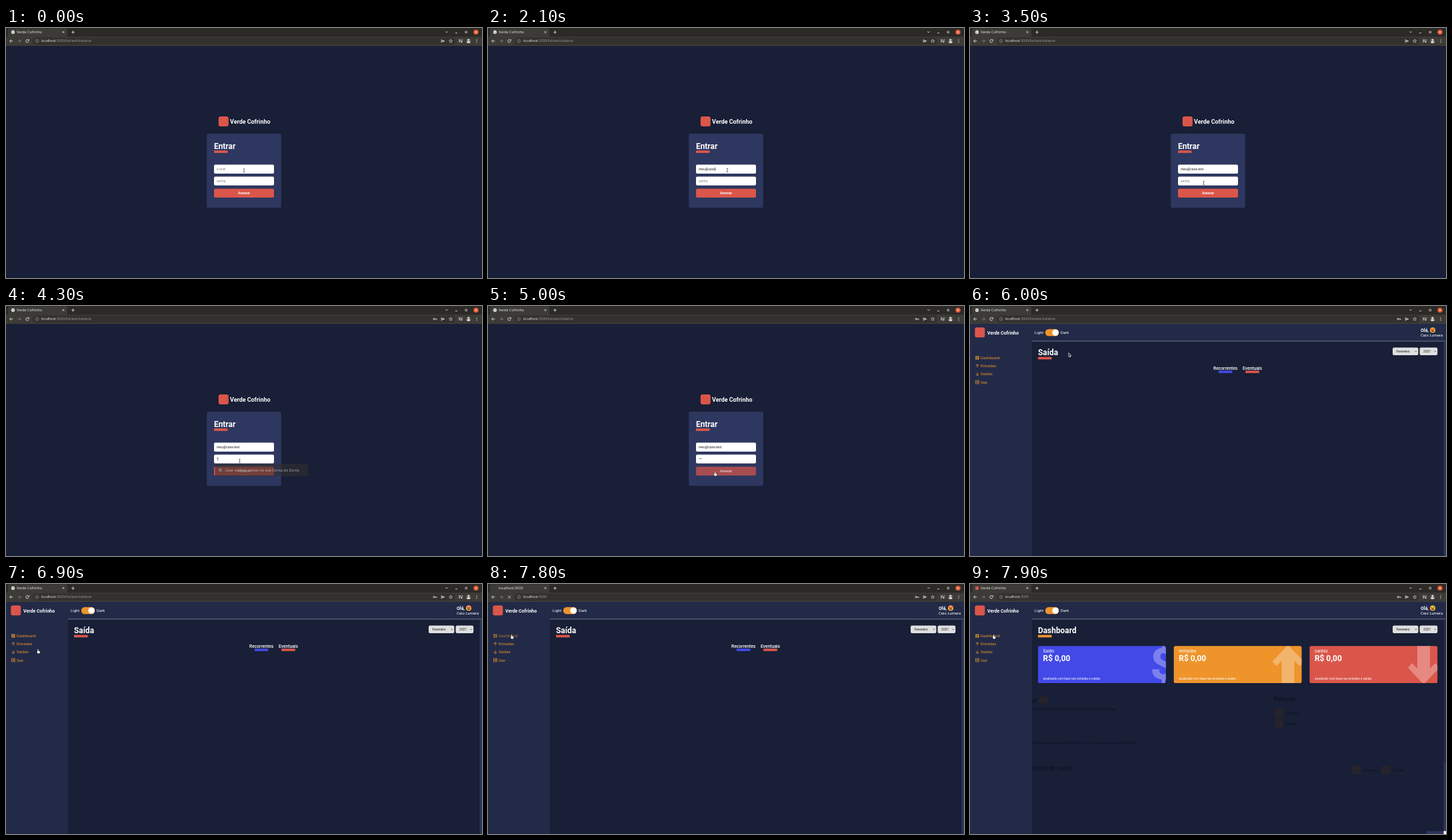
An HTML page with a canvas that plays this animation: 714 by 376 pixels, repeating every 8 s.

```html
<!DOCTYPE html>
<html lang="pt-BR">
<head>
<meta charset="utf-8">
<title>Verde Cofrinho</title>
<style>
html, body { margin: 0; width: 714px; height: 376px; overflow: hidden; background: #181f36; }
canvas { display: block; width: 714px; height: 376px; }
</style>
</head>
<body>
<canvas id="stage"></canvas>
<script>
const W = 714, H = 376, LOOP = 8000, STEP = 100;
const BG = '#181f36', SIDE = '#222a48', CARD = '#2e375f', THUMB = '#2c355a';
const RED = '#da564a', ORANGE = '#ee942b', BLUE = '#4249e7', WHITE = '#fff';
const INK = '#e6e4df', DIM = '#9d9a94';
const ROBOTO = 'Roboto, sans-serif', UI = '"Noto Sans", sans-serif';
const BRAND = 'Verde Cofrinho', EMAIL = 'meu@casa.test', USER = 'Caio Lumera';
const REM = 5.95, SMALL = 4.96, LABEL = 6.7, H1 = 11.9;

// Moments of the story
const FOCUS = 100, TYPE = [1000, 2700], PASS = [4200, 4500], FOCUS_PASS = 3700;
const LOGIN_END = 5100, LOADING = 7500, HOME = 7900;

const canvas = document.getElementById('stage');
const dpr = window.devicePixelRatio || 1;
canvas.width = W * dpr;
canvas.height = H * dpr;
const c = canvas.getContext('2d');

function rect(x, y, w, h, color, r = 0) {
  c.fillStyle = color;
  c.beginPath();
  c.roundRect(x, y, w, h, r);
  c.fill();
}

function disc(x, y, r, color) {
  c.fillStyle = color;
  c.beginPath();
  c.arc(x, y, r, 0, Math.PI * 2);
  c.fill();
}

function ring(x, y, r, color, width = 0.7, from = 0, to = Math.PI * 2) {
  c.strokeStyle = color;
  c.lineWidth = width;
  c.beginPath();
  c.arc(x, y, r, from, to);
  c.stroke();
}

function frame(x, y, size, color) {
  c.strokeStyle = color;
  c.lineWidth = 0.7;
  c.strokeRect(x - size / 2, y - size / 2, size, size);
}

// Flat list of x, y offsets from (ox, oy)
function trace(ox, oy, pts) {
  c.beginPath();
  for (let i = 0; i < pts.length; i += 2) c.lineTo(ox + pts[i], oy + pts[i + 1]);
}

function line(ox, oy, pts, color = INK, width = 0.8) {
  trace(ox, oy, pts);
  c.strokeStyle = color;
  c.lineWidth = width;
  c.stroke();
}

function cross(x, y, r, color = INK) {
  line(x, y, [-r, -r, r, r], color);
  line(x, y, [-r, r, r, -r], color);
}

function chevron(x, y, r, color) {
  line(x, y, [-r, -r / 2, 0, r / 2, r, -r / 2], color);
}

function arrow(x, y, angle, color, r = 2.4) {
  c.save();
  c.translate(x, y);
  c.rotate(angle);
  line(0, 0, [-r, 0, r, 0], color);
  line(0, 0, [0, -r, r, 0, 0, r], color);
  c.restore();
}

// y is the middle of the capitals
function text(str, x, y, size, color = WHITE, weight = 400, family = ROBOTO, align = 'left') {
  c.font = `${weight} ${size}px ${family}`;
  c.fillStyle = color;
  c.textAlign = align;
  c.fillText(str, x, y + size * 0.356);
  return c.measureText(str).width;
}

function faded(alpha, draw) {
  c.save();
  c.globalAlpha *= alpha;
  draw();
  c.restore();
}

const ramp = (t, from, to) => Math.min(1, Math.max(0, (t - from) / (to - from)));
const ease = p => p * p * (3 - 2 * p);

// Characters typed at an even pace, the first at once
const typed = (str, t, [from, to]) =>
  t < from ? '' : str.slice(0, 1 + Math.floor(ramp(t, from, to) * (str.length - 1)));

function browser(t) {
  const home = t >= HOME, loading = t >= LOADING && !home;
  rect(0, 0, W, 14, '#2b2a27');
  rect(3, 0.5, 89, 14, '#3c3b37', [3, 3, 0, 0]);
  rect(0, 13, W, 14, '#3c3b37');
  rect(40, 14.5, 634, 10.5, '#32312e', 5);

  if (home) rect(8, 3.7, 5, 5, RED, 1);
  else if (!loading) {
    disc(10.5, 6.2, 2.6, INK);
    chevron(10.5, 6.2, 1.5, '#66645f');
  }
  text(loading ? 'localhost:3000' : BRAND, 16, 6.3, 5.4, INK, 400, UI);
  cross(86, 6.2, 1.4);
  line(100.5, 6.3, [-2.5, 0, 2.5, 0]);
  line(100.5, 6.3, [0, -2.5, 0, 2.5]);

  chevron(661, 6, 1.8, INK);
  line(675.5, 7.5, [-1.6, 0, 1.6, 0]);
  frame(690.3, 6.3, 2.6, INK);
  disc(705, 6.2, 3.8, '#e2592f');
  cross(705, 6.2, 1.3, WHITE);

  const y = 19.6;
  arrow(8, y, Math.PI, INK);
  arrow(20, y, 0, '#85827d');
  if (loading) cross(32, y, 2);
  else {
    ring(32, y, 2.2, INK, 0.9, 0.4, 5.5);
    line(32, y, [2.5, -2.6, 2.5, -0.6, 0.5, -0.6]);
  }
  ring(46.5, y, 2.4, DIM, 0.6);
  line(46.5, y, [0, -1.3, 0, 1.4], DIM, 0.6);
  const w = text('localhost', 53, y, 5.15, INK, 400, UI);
  text(t >= LOADING ? ':3000' : ':3000/list/exit-balance', 53 + w, y, 5.15, DIM, 400, UI);

  if (t >= PASS[0]) {
    ring(642.2, y, 1.2, INK, 0.9);
    line(643.4, y, [0, 0, 2.6, 0, 2.6, 1.3], INK, 0.9);
  }
  line(655.3, y, [-2, 0, 2.4, 0, -2.4, -2, -2, 0, -2.4, 2, 2.4, 0], INK, 0.7);
  c.beginPath();
  for (let i = 0; i < 10; i++) {
    const r = i % 2 ? 1.2 : 2.7, a = i * Math.PI / 5 - Math.PI / 2;
    c.lineTo(667.2 + r * Math.cos(a), y + r * Math.sin(a));
  }
  c.closePath();
  c.lineWidth = 0.6;
  c.stroke();
  for (let i = 0; i < 3; i++) {
    line(679, 17.8 + i * 1.6, [0, 0, i < 2 ? 3.6 : 2, 0]);
    disc(706, y - 2 + i * 2, 0.65, INK);
  }
  disc(683.3, 21, 1, INK);
  line(684, 21, [0, 0, 0, -3.3, 1.2, -3.3], INK, 0.7);
  disc(693.8, y, 3.8, '#55524d');
  disc(693.8, 18, 1.6, '#e4e2de');
  rect(691.3, 20, 5, 2.6, '#e4e2de', 1.2);
}

function field(y, value, hint, caret) {
  rect(312, y, 90, 13.4, WHITE, 2);
  const mid = y + 6.6;
  const w = value ? text(value, 316, mid, SMALL, '#222') : 0;
  if (!value) text(hint, 316, mid, SMALL, '#858585');
  if (caret) rect(316 + w, mid - 2.9, 0.5, 5.8, '#111');
}

function login(t) {
  rect(0, 27, W, H - 27, BG);
  rect(318.8, 133, 15, 15, RED, 3);
  text(BRAND, 336, 140.6, 8.93, WHITE, 700);
  rect(301.2, 159, 111.6, 111.4, CARD, 2.6);
  text('Entrar', 312, 177.3, H1, WHITE, 700);
  rect(312, 184.2, 20.5, 3.7, RED);

  // The caret rests half a second or so after the last action
  const emailCaret = t >= FOCUS && t < TYPE[1] + 500 && ramp(t, 800, TYPE[0]) % 1 === 0;
  field(205.5, typed(EMAIL, t, TYPE), 'e-mail', emailCaret);
  field(223.4, typed('•••', t, PASS), 'senha', t >= FOCUS_PASS && t < PASS[1] + 500);

  faded(1 - 0.3 * ramp(t, 4700, 5000), () => {
    rect(312, 241.8, 90, 13.2, RED, 2);
    text('Acessar', 357, 248.4, SMALL, WHITE, 700, ROBOTO, 'center');
  });

  faded(ramp(t, FOCUS_PASS - 100, 3900) * (1 - ramp(t, 4100, 4600)), () => {
    rect(313.5, 237, 139.5, 19, '#30302f', 1);
    disc(321.5, 246.7, 2.7, '#8d8d8b');
    text('Usar senhas salvas na sua Conta do Zurila', 329, 246.7, 5.64, WHITE, 400, UI);
  });
}

function emoji(x, y, starry) {
  disc(x, y, 4, '#f9c23c');
  for (const s of [-1, 1]) disc(x + s * 1.6, y - 1, starry ? 1.4 : 0.7, starry ? '#e8543f' : '#4a2b12');
  c.fillStyle = '#7a2c1c';
  c.beginPath();
  c.arc(x, y + 0.6, 2.2, 0, Math.PI);
  c.fill();
}

function select(x, w, label) {
  rect(x, 62.6, w, 11.4, '#e0e0e0', 2);
  text(label, x + 5.5, 68.4, SMALL, '#1c1c1c');
  chevron(x + w - 3.6, 68.3, 1.2, '#222');
}

function menuIcon(i, y) {
  if (i === 0) {
    for (const s of [0, 1]) {
      rect(8.2 + s * 3, y - 2.5, 2.3, 2.9 - s * 1.3, ORANGE);
      rect(8.2 + s * 3, y + 1 - s * 1.3, 2.3, 1.6 + s * 1.3, ORANGE);
    }
  } else if (i < 3) arrow(11, y, i === 1 ? -Math.PI / 2 : Math.PI / 2, ORANGE);
  else {
    frame(10.9, y, 4.8, ORANGE);
    arrow(10.9, y, 0, ORANGE, 1.3);
  }
}

function shell(t) {
  const home = t >= HOME;
  rect(0, 27, W, H - 27, BG);
  rect(0, 27, W, 26, SIDE);
  rect(0, 27, 93, H - 27, SIDE);
  rect(93, 52.5, W - 93, 0.8, '#8a8e9c');
  rect(710.5, 53.3, 3.5, H - 53, home ? SIDE : THUMB);

  rect(7.3, 32.3, 15, 15, RED, 3);
  text(BRAND, 26, 40.2, 6.96, WHITE, 700);
  text('Light', 97, 40.1, REM);
  rect(112.8, 34.8, 20.6, 10.4, ORANGE, 5.2);
  disc(128.2, 40, 4.8, WHITE);
  text('Dark', 136, 40.1, REM);
  text('Olá,', 676, 36.3, 6.96, WHITE, 700);
  emoji(694, 36.2, !home);
  text(USER, 676, 44.2, REM);

  const hover = home ? 0 : ramp(t, 7000, 7300);
  ['Dashboard', 'Entradas', 'Saídas', 'Sair'].forEach((label, i) => {
    const y = 77.9 + i * 12.2;
    faded(i ? 1 : 1 - 0.3 * hover, () => {
      menuIcon(i, y);
      text(label, 16, y, REM, ORANGE);
    });
  });
  select(634, 38.4, 'Fevereiro');
  select(674.6, 26.6, '2021');
}

function title(label, color) {
  text(label, 102, 69.8, H1, WHITE, 700);
  rect(102, 76.6, 20.6, 3.7, color);
}

function filter(label, x, color) {
  const w = text(label, x, 93.8, LABEL, WHITE, 500);
  rect(x + w / 2 - 10.3, 97.2, 20.6, 3.7, color);
}

function expenses() {
  title('Saída', RED);
  filter('Recorrentes', 365, BLUE);
  filter('Eventuais', 409, RED);
}

function bigArrow(x, tip, dir) {
  c.save();
  c.translate(x, tip);
  c.scale(1, dir);
  c.beginPath();
  const half = [0, 0, 23.5, 25, 17.5, 32, 9.5, 24, 9.5, 62];
  for (let i = 0; i < half.length; i += 2) c.lineTo(half[i], half[i + 1]);
  for (let i = half.length - 2; i >= 0; i -= 2) c.lineTo(-half[i], half[i + 1]);
  c.fillStyle = WHITE;
  c.fill();
  c.restore();
}

function balance(i, color, label, icon) {
  const x = 102 + i * 203.7;
  c.save();
  rect(x, 93.3, 191.8, 55.8, color, 2.6);
  c.clip();
  c.globalAlpha = 0.3;
  icon();
  c.restore();
  text(label, x + 7.6, 101, LABEL);
  text('R$ 0,00', x + 7.6, 112.2, H1, WHITE, 700);
  text('atualizado com base nas entradas e saídas', x + 7.6, 142.4, 4.46);
}

function legend(x, y, label, ink) {
  rect(x, y, 13, 13.5, '#2a2429', 2);
  text(label, x + 16, y + 6.7, REM, ink);
}

// Lower panels just starting to fade in from the left
function incoming() {
  const ink = '#0c1122';
  c.save();
  c.beginPath();
  c.rect(93, 155, 617, 217);
  c.clip();
  faded(0.8, () => {
    text('Muito mal!', 101, 175.5, 8.9, ink, 700, ROBOTO, 'right');
    rect(104, 168.5, 13, 11.5, '#2a2429', 3);
    text('Neste mês, você gastou mais do que deveria ter.', 93, 187.5, REM, ink);
    text('Verifique seus gastos e tente cortar algumas coisas do mês.', 93, 238.5, REM, ink);
    text('Relação', 456, 173, 8.9, ink, 700);
    text('Histórico de saldo', 80, 277, 8.9, ink, 700);
    ['Entradas', 'Saídas'].forEach((label, i) => {
      legend(457, 187 + i * 16, label, ink);
      legend(573 + i * 45, 273, label, ink);
    });
  });
  c.restore();
}

function dashboard() {
  title('Dashboard', ORANGE);
  incoming();
  balance(0, BLUE, 'Saldo', () => text('$', 270.5, 120, 65, WHITE, 900));
  balance(1, ORANGE, 'entradas', () => bigArrow(477, 91.5, 1));
  balance(2, RED, 'saídas', () => bigArrow(680.5, 151, -1));
  rect(710.5, 269, 3.5, 102, THUMB);
  rect(685, 371.5, 25.5, 4.5, THUMB);
  rect(710.5, 371.5, 3.5, 4.5, WHITE);
}

// Each move: start time, end time, destination
const MOVES = [[100, 200, 359, 214], [3100, 3500, 350.5, 233], [4500, 4900, 340.5, 249],
  [5500, 6000, 148, 70.5], [6000, 6400, 115, 45], [6400, 6900, 48, 98], [6900, 7300, 35.5, 76]];

function mouseAt(t) {
  let x = 357, y = 214.5;
  for (const [from, to, tx, ty] of MOVES) {
    const e = ease(ramp(t, from, to));
    x += (tx - x) * e;
    y += (ty - y) * e;
  }
  return [x, y];
}

function pointer(t) {
  const [x, y] = mouseAt(t);
  const hand = (t >= 4800 && t < LOGIN_END) || t >= 6800;
  if (hand) {
    rect(x - 1.6, y + 2.3, 4.8, 4.5, '#14161d', 1.4);
    rect(x - 0.9, y - 0.3, 1.8, 5, '#14161d', 0.9);
    rect(x - 1.2, y + 2.7, 4, 3.7, WHITE, 1.1);
    rect(x - 0.5, y, 1.1, 5, WHITE, 0.5);
  } else if (t < LOGIN_END) {
    for (const s of [-1, 1]) line(x, y, [-1.3, 2.9 * s, 0, 2.4 * s, 1.3, 2.9 * s], '#33353c', 0.6);
    line(x, y, [0, -2.5, 0, 2.5], '#33353c', 0.7);
  } else {
    trace(x, y, [0, 0, 0, 5.8, 1.3, 4.6, 2.5, 6.6, 2.5, 4.3, 4, 4.2]);
    c.closePath();
    c.fillStyle = '#14161d';
    c.strokeStyle = WHITE;
    c.lineWidth = 0.7;
    c.fill();
    c.stroke();
  }
}

function draw(t) {
  c.setTransform(dpr, 0, 0, dpr, 0, 0);
  if (t < LOGIN_END) login(t);
  else {
    shell(t);
    if (t < HOME) expenses();
    else dashboard();
  }
  browser(t);
  pointer(t);
}

const start = performance.now();
function tick() {
  const t = (performance.now() - start) % LOOP;
  draw(Math.floor(t / STEP) * STEP);
  requestAnimationFrame(tick);
}
tick();
</script>
</body>
</html>
```
